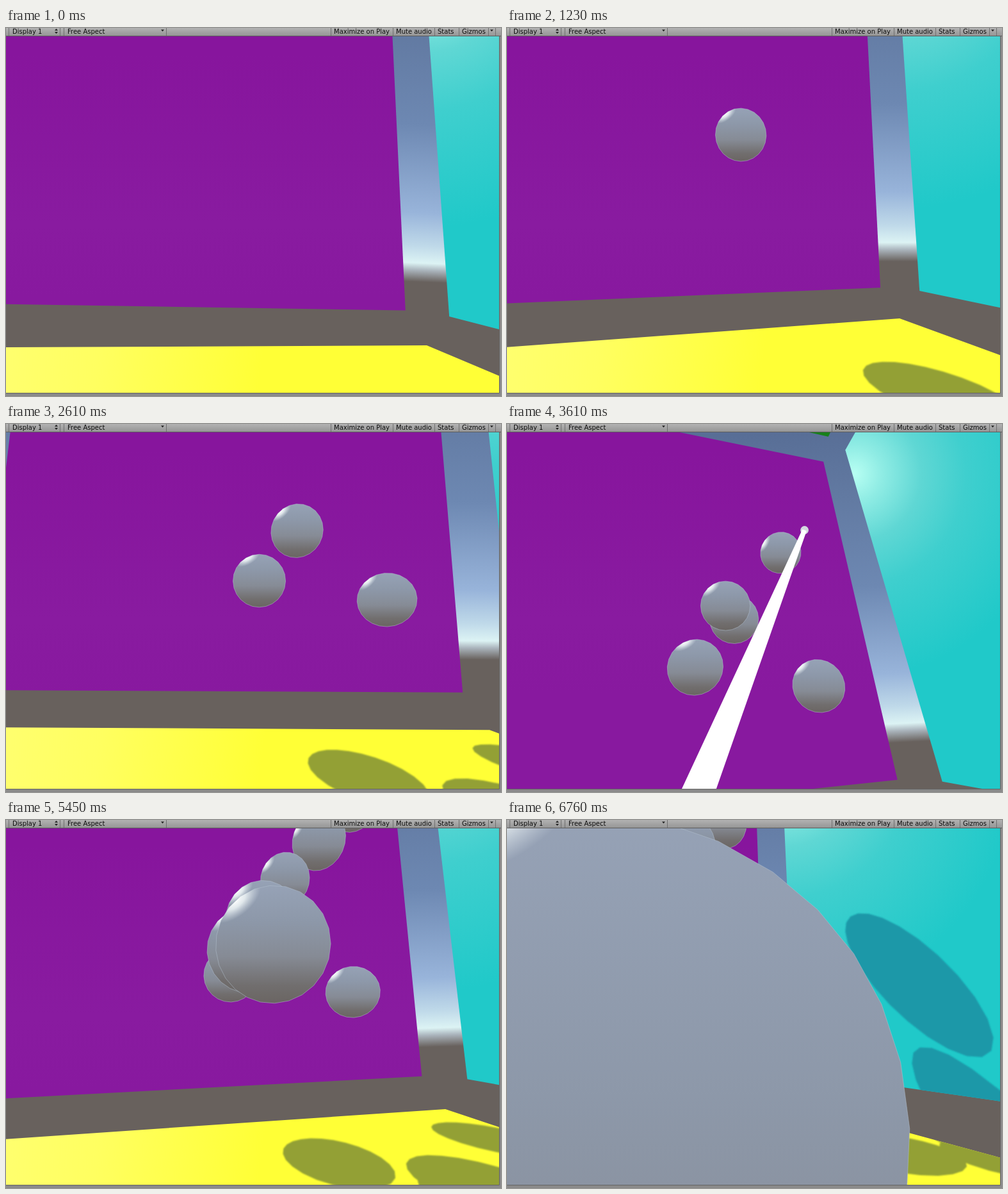
Write an HTML page that moves like this. It is 773 px wide and 574 px high and loops after 6.84 s.

```html
<!DOCTYPE html>
<html lang="en">
<head>
<meta charset="utf-8">
<title>Room with spheres</title>
<style>
  html, body { margin: 0; width: 100%; height: 100%; overflow: hidden; background: #8a8a8a; }
  svg { display: block; width: 100vw; height: 100vh; }
  text { font: 10px "DejaVu Sans", Verdana, sans-serif; fill: #0c0c0c; }
</style>
</head>
<body>
<svg viewBox="0 0 773 574" preserveAspectRatio="none">
  <defs>
    <clipPath id="view"><rect y="13" width="770" height="556"/></clipPath>
    <clipPath id="floorClip"><polygon id="floorShape"/></clipPath>
    <clipPath id="sideClip"><polygon id="sideShape"/></clipPath>
    <filter id="soft" filterUnits="userSpaceOnUse" x="0" y="0" width="773" height="574">
      <feGaussianBlur stdDeviation="1"/>
    </filter>
    <linearGradient id="bar" x2="0" y2="1">
      <stop stop-color="#b2b2b2"/><stop offset="1" stop-color="#969696"/>
    </linearGradient>
    <linearGradient id="sky" gradientUnits="userSpaceOnUse" x1="0" x2="0" y1="-480" y2="12">
      <stop stop-color="#586e96"/><stop offset=".22" stop-color="#627aa2"/>
      <stop offset=".5" stop-color="#6d88b2"/><stop offset=".78" stop-color="#98b4da"/>
      <stop offset=".885" stop-color="#bfd9e9"/><stop offset=".94" stop-color="#dcf3f4"/>
      <stop offset=".963" stop-color="#aab4bc"/><stop offset="1" stop-color="#68615d"/>
    </linearGradient>
    <linearGradient id="purple" gradientUnits="userSpaceOnUse" x1="0" x2="0" y1="40" y2="420">
      <stop stop-color="#87159d"/><stop offset=".7" stop-color="#891ba0"/><stop offset="1" stop-color="#88199f"/>
    </linearGradient>
    <linearGradient id="yellow" gradientUnits="userSpaceOnUse" x1="0" x2="460" y1="0" y2="60">
      <stop stop-color="#ffff74"/><stop offset=".45" stop-color="#ffff60"/><stop offset="1" stop-color="#ffff36"/>
    </linearGradient>
    <radialGradient id="cyan" gradientUnits="userSpaceOnUse" cx="0" cy="0" r="1">
      <stop stop-color="#b8fff3"/><stop offset=".14" stop-color="#8fece4"/>
      <stop offset=".33" stop-color="#5fd7d4"/><stop offset=".55" stop-color="#3fcfce"/>
      <stop offset="1" stop-color="#20c9c9"/>
    </radialGradient>
    <linearGradient id="grey" x2="0" y2="1">
      <stop stop-color="#96a2b6"/><stop offset=".3" stop-color="#8d98a9"/>
      <stop offset=".6" stop-color="#868b95"/><stop offset=".85" stop-color="#716e6e"/>
      <stop offset="1" stop-color="#6a6562"/>
    </linearGradient>
    <radialGradient id="shine" gradientUnits="userSpaceOnUse" cx="0" cy="0" r="1">
      <stop stop-color="#fff"/><stop offset=".4" stop-color="#f4fafa" stop-opacity=".8"/>
      <stop offset="1" stop-color="#dfe8ee" stop-opacity="0"/>
    </radialGradient>
  </defs>

  <g clip-path="url(#view)">
    <rect width="773" height="574" fill="#68615d"/>
    <g id="skyGroup"><rect x="-900" y="-900" width="1800" height="912" fill="url(#sky)"/></g>
    <polygon id="ceiling" fill="#17801a"/>
    <polygon id="wall" fill="url(#purple)"/>
    <polygon id="side" fill="url(#cyan)"/>
    <g clip-path="url(#sideClip)"><path id="sideShadow" fill="#1a98a8" filter="url(#soft)"/></g>
    <polygon id="floor" fill="url(#yellow)"/>
    <g clip-path="url(#floorClip)"><path id="floorShadow" fill="#93a034" filter="url(#soft)"/></g>
    <g id="balls"></g>
    <g id="beam">
      <circle id="beamDot" fill="#d3d9df"/>
      <polygon id="beamRay" fill="#fff"/>
    </g>
  </g>

  <rect width="773" height="12" fill="url(#bar)"/>
  <path d="M0 12.5H773" stroke="#5e5e5e"/>
  <path d="M4.5 0V12M84.5 0V12M90.5 0V12M250.5 0V12M507.5 0V12M604.5 0V12M669.5 0V12M707.5 0V12M753.5 0V12M764.5 0V12" stroke="#707070"/>
  <path d="M76 4l2.5-3 2.5 3zM76 6l2.5 3 2.5-3zM242 2.500h5l-2.500 3zM756 2.500h5l-2.500 3z" fill="#222"/>
  <text x="10" y="8.500">Display 1</text>
  <text x="96" y="8.500">Free Aspect</text>
  <text x="512" y="8.500">Maximize on Play</text>
  <text x="609" y="8.500">Mute audio</text>
  <text x="674" y="8.500">Stats</text>
  <text x="712" y="8.500">Gizmos</text>
  <path d="M770 13h3v561H0v-5h770z" fill="#8a8a8a"/>
  <path d="M770.5 13V569.5H0" fill="none" stroke="#646464"/>
</svg>

<script>
const LOOP = 6840, STEP = 76.82, LAST = 88;
const FOCAL = 410, CX = 385, CY = 291, NEAR = .05;

// The viewer stands at the origin and only turns its head (degrees at each key time).
const KEY_TIMES = [0, 1230, 2610, 3610, 4530, 5450, 6760];
const YAW = [8.1, 12.7, 0, 14.5, 5.95, 6.1, 35.85];
const PITCH = [9.1, 6.27, 6.5, 24.7, 18.7, 6.14, 5.7];
const ROLL = [2.47, 0, .3, -2.83, -.3, -1.86, -1.8];

// A box of panels, each one unit short of the box edges.
const LEFT = -10.1, RIGHT = 7.8, BOTTOM = -1.87, TOP = 15.8, BACK = 9;
const level = y => [[LEFT, y, BACK], [RIGHT, y, BACK], [RIGHT, y, -BACK], [LEFT, y, -BACK]];
const PANELS = {
  wall: [[LEFT, TOP, BACK + 1], [RIGHT, TOP, BACK + 1], [RIGHT, BOTTOM, BACK + 1], [LEFT, BOTTOM, BACK + 1]],
  side: [[RIGHT + 1, TOP, BACK], [RIGHT + 1, TOP, -BACK], [RIGHT + 1, BOTTOM, -BACK], [RIGHT + 1, BOTTOM, BACK]],
  floor: level(BOTTOM - 1),
  ceiling: level(TOP + 1)
};
const GLOW = [8.8, 13.5, 8.9];
const LIGHT = [.321, -.766, -.557];
const HAND = [-1.05, -2.5, .65];

// Unit balls: time of birth and place.
const BALLS = [
  [850, 1.71, 4.24, 9.85], [1750, .25, 2.26, 9.85], [2250, 5, 1.54, 9.75],
  [3100, 1.32, 4.7, 9.6], [3400, 4.12, 8, 10], [3640, 5.57, 9.47, 9.5],
  [3900, 3.75, 7.35, 9.1], [4150, 2.58, 6.28, 10], [4400, 1.44, 3.98, 8.62],
  [4560, 1.08, 3.09, 6.83], [4850, .62, 1.99, 6.1], [5200, .87, 1.54, 4.48]
].map(([born, ...at]) => ({ born, at }));

const dot = (a, b) => a[0] * b[0] + a[1] * b[1] + a[2] * b[2];
const cross = (a, b) => [a[1] * b[2] - a[2] * b[1], a[2] * b[0] - a[0] * b[2], a[0] * b[1] - a[1] * b[0]];
const scale = (a, k) => a.map(v => v * k);
const along = (a, d, k) => a.map((v, i) => v + d[i] * k);
const mix = (a, b, u) => a.map((v, i) => v + (b[i] - v) * u);
const size = a => Math.hypot(...a);
const unit = a => scale(a, 1 / size(a));

// The last balls pile up towards the viewer.
const pile = BALLS[BALLS.length - 1], nearest = [.324, -.224, 1.255];
for (let i = 1; i <= 3; i++)
  BALLS.push({ born: pile.born + i * 430, at: mix(pile.at, nearest, i / 3) });

// Points of a circle around a centre, facing along an axis.
function ring(centre, axis, radius) {
  const e = unit(cross(axis, [0, 1, 0])), f = unit(cross(axis, e));
  return Array.from({ length: 24 }, (_, i) => {
    const a = i * Math.PI / 12;
    return along(along(centre, e, radius * Math.cos(a)), f, radius * Math.sin(a));
  });
}

const $ = id => document.getElementById(id);
const set = (el, attrs) => { for (const k in attrs) el.setAttribute(k, attrs[k]); };
const add = (parent, tag, attrs) => {
  const el = document.createElementNS("http://www.w3.org/2000/svg", tag);
  set(el, attrs);
  return parent.appendChild(el);
};
const show = (el, visible) => el.setAttribute("visibility", visible ? "visible" : "hidden");

// Cubic interpolation through the keys.
function sample(keys, t) {
  const at = i => keys[Math.max(0, Math.min(keys.length - 1, i))];
  let i = 0;
  while (i < KEY_TIMES.length - 2 && t >= KEY_TIMES[i + 1]) i++;
  const u = Math.min(1, (t - KEY_TIMES[i]) / (KEY_TIMES[i + 1] - KEY_TIMES[i]));
  const a = at(i), b = at(i + 1);
  const m = .3 * (b - at(i - 1)), n = .3 * (at(i + 2) - a);
  return a + u * (m + u * (3 * (b - a) - 2 * m - n + u * (2 * (a - b) + m + n)));
}

const turn = (a, b, angle) =>
  [a * Math.cos(angle) - b * Math.sin(angle), a * Math.sin(angle) + b * Math.cos(angle)];
let yaw, pitch, roll;

function toCamera([x, y, z]) {
  [x, z] = turn(x, z, yaw);
  [y, z] = turn(y, z, pitch);
  [x, y] = turn(x, y, -roll);
  return [x, y, z];
}
const toScreen = ([x, y, z]) => [CX + FOCAL * x / z, CY - FOCAL * y / z];

// Projects a polygon, cut off just in front of the viewer.
function project(shape) {
  const seen = shape.map(toCamera), out = [];
  seen.forEach((p, i) => {
    const q = seen[(i + 1) % seen.length];
    if (p[2] > NEAR) out.push(p);
    if (p[2] > NEAR !== q[2] > NEAR) out.push(mix(p, q, (NEAR - p[2]) / (q[2] - p[2])));
  });
  return out.map(p => toScreen(p).map(v => v.toFixed(2)).join()).join(" ");
}

// Far balls first, so that near ones cover them.
[...BALLS].sort((a, b) => size(b.at) - size(a.at)).forEach((ball, i) => {
  const distance = size(ball.at), rim = 1 - 1 / distance ** 2;
  ball.outline = ring(scale(ball.at, rim), unit(ball.at), Math.sqrt(rim));
  const sun = along(scale(LIGHT, -1), ball.at, dot(LIGHT, ball.at) / distance ** 2);
  ball.lit = along(scale(ball.at, rim), unit(sun), Math.sqrt(rim));
  ball.size = FOCAL / distance;
  ball.shadow = ring(ball.at, LIGHT, 1);

  ball.el = add($("balls"), "g", {});
  ball.shine = add(ball.el, "radialGradient", { id: "shine" + i, href: "#shine" });
  ball.shapes = ["url(#grey)", `url(#shine${i})`].map(fill => add(ball.el, "polygon", { fill }));
  set(ball.shapes[0], { stroke: "#b4c2d0", "stroke-opacity": .5 });
});

function drawBall(ball) {
  const points = project(ball.outline);
  ball.shapes.forEach(el => set(el, { points }));
  const [x, y] = toScreen(toCamera(ball.lit)), [cx, cy] = toScreen(toCamera(ball.at));
  const angle = Math.atan2(y - cy, x - cx) * 180 / Math.PI;
  set(ball.shine, {
    gradientTransform: `translate(${x} ${y}) rotate(${angle}) scale(${.28 * ball.size} ${.55 * ball.size})`
  });
}

// Shadow outlines thrown on the plane where the given axis has the given value.
const shadowPath = (balls, axis, value) => balls.map(b => "M" + project(
  b.shadow.map(p => along(p, LIGHT, (value - p[axis]) / LIGHT[axis]))) + "Z").join("");

// The beam sweeps to the place of the next ball shortly before its birth.
function drawBeam(t) {
  const next = BALLS.findIndex(b => b.born > t);
  const to = BALLS[next], from = BALLS[next - 1] || { born: 0, at: HAND };
  const u = to ? (t - from.born) / (to.born - from.born) : 0;
  show($("beam"), u > .65);
  if (u <= .65) return;
  const tip = mix(from.at, to.at, u);
  const edge = scale(unit(cross(along(tip, HAND, -1), tip)), .114);
  set($("beamRay"), { points: project(
    [along(HAND, edge, 1), along(tip, edge, 1), along(tip, edge, -1), along(HAND, edge, -1)]) });
  const seen = toCamera(tip), [cx, cy] = toScreen(seen);
  set($("beamDot"), { cx, cy, r: .21 * FOCAL / seen[2] });
}

function draw(t) {
  [yaw, pitch, roll] = [YAW, PITCH, ROLL].map(keys => sample(keys, t) * Math.PI / 180);

  set($("skyGroup"), { transform:
    `translate(${CX} ${CY}) rotate(${roll * 180 / Math.PI}) translate(0 ${FOCAL * Math.tan(pitch) + 16})` });
  for (const id in PANELS) set($(id), { points: project(PANELS[id]) });
  for (const id of ["floor", "side"]) set($(id + "Shape"), { points: $(id).getAttribute("points") });

  const glow = toCamera(GLOW);
  set($("cyan"), { gradientTransform: `translate(${toScreen(glow)}) scale(${12 * FOCAL / glow[2]})` });

  const born = BALLS.filter(b => b.born <= t);
  set($("floorShadow"), { d: shadowPath(born, 1, BOTTOM - 1) });
  set($("sideShadow"), { d: shadowPath(born, 0, RIGHT + 1) });

  BALLS.forEach(b => show(b.el, b.born <= t));
  born.forEach(drawBall);
  drawBeam(t);
}

const start = performance.now();
function tick() {
  const t = (performance.now() - start) % LOOP;
  draw(Math.min(LAST, Math.floor(t / STEP + .06)) * STEP);
  requestAnimationFrame(tick);
}
tick();
</script>
</body>
</html>
```
